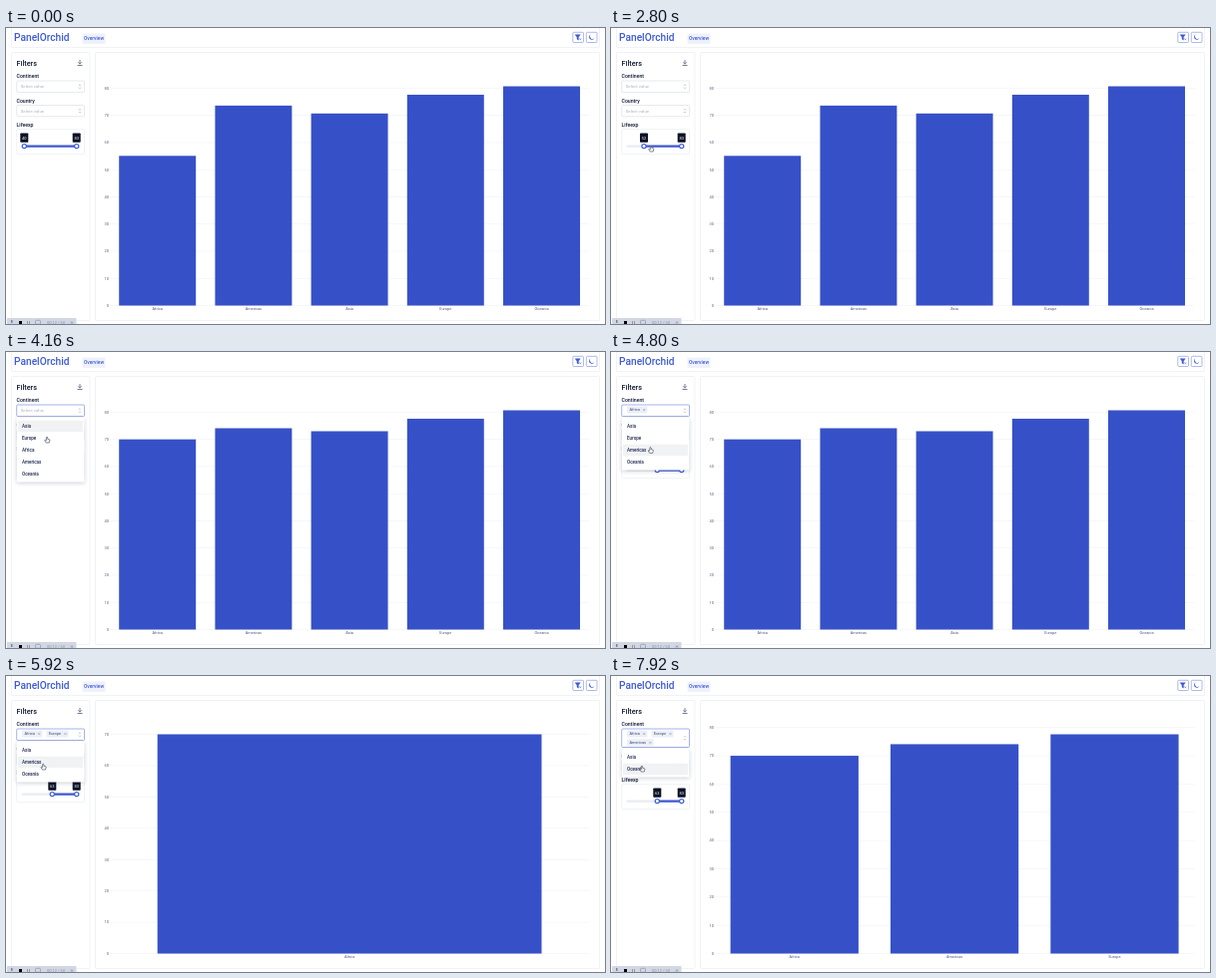
An HTML page with a canvas that plays this animation: 600 px wide and 297 px high, repeating every 8 s.

```html
<!DOCTYPE html>
<html lang="en">
<head>
<meta charset="utf-8">
<title>Dashboard filters</title>
<style>
  html, body { margin: 0; height: 100%; overflow: hidden; background: #fff; }
  canvas { display: block; width: 100vw; height: 100vh; }
</style>
</head>
<body>
<canvas></canvas>
<script>
const WIDTH = 600, HEIGHT = 297, LOOP = 8000;
const BLUE = '#3f5bd5', BAR = '#3650c8', NAVY = '#111936', LINE = '#e9eef3', MUTED = '#a9b0bd';
const canvas = document.querySelector('canvas');
const ctx = canvas.getContext('2d');

const CONTINENTS = ['Asia', 'Europe', 'Africa', 'Americas', 'Oceania'];
const ALL_LIVES = { Africa: 55.1, Americas: 73.6, Asia: 70.7, Europe: 77.6, Oceania: 80.7 };
const LONG_LIVES = { Africa: 70, Americas: 74.1, Asia: 73, Europe: 77.6, Oceania: 80.7 };

const FILTER_TIME = 3360, MENU_TIME = 3850;
const PICKS = [
  { name: 'Africa', at: 4600, charted: 4900 },
  { name: 'Europe', at: 5850, charted: 6200 },
  { name: 'Americas', at: 7350, charted: 7680 },
];

// Each key is [time, ...values].
const CURSOR = [
  [500, 330, 300], [1200, 83, 50], [1350, 83, 50], [1900, 18, 119], [2150, 18, 119],
  [2800, 40, 118], [3000, 46, 118], [3250, 46, 118], [3650, 42, 59], [3850, 42, 59],
  [4160, 41, 85], [4450, 40, 98], [4650, 40, 98], [5100, 38, 88], [6300, 37, 88],
  [7040, 31, 90], [7920, 31, 90],
];
const HANDLE = [[2150, 18.3], [2800, 33], [3050, 46.3]];

function sample(keys, time) {
  if (time <= keys[0][0]) return keys[0].slice(1);
  const next = keys.findIndex(key => key[0] > time);
  if (next < 0) return keys.at(-1).slice(1);
  const from = keys[next - 1], to = keys[next];
  const u = (time - from[0]) / (to[0] - from[0]);
  const eased = u * u * (3 - 2 * u);
  return from.slice(1).map((value, i) => value + (to[i + 1] - value) * eased);
}

function text(string, x, y, size, color = NAVY, weight = 400, align = 'left') {
  ctx.font = `${weight} ${size}px Roboto, sans-serif`;
  ctx.fillStyle = color;
  ctx.textAlign = align;
  ctx.fillText(string, x, y);
}

function box(x, y, w, h, fill, stroke, radius = 1) {
  ctx.beginPath();
  ctx.roundRect(x, y, w, h, radius);
  paint(fill, stroke);
}

function paint(fill, stroke, width = 0.7) {
  if (fill) { ctx.fillStyle = fill; ctx.fill(); }
  if (stroke) { ctx.strokeStyle = stroke; ctx.lineWidth = width; ctx.stroke(); }
}

function shape(path, x, y, fill, stroke, width) {
  ctx.save();
  ctx.translate(x, y);
  const outline = new Path2D(path);
  if (fill) { ctx.fillStyle = fill; ctx.fill(outline); }
  if (stroke) { ctx.strokeStyle = stroke; ctx.lineWidth = width; ctx.stroke(outline); }
  ctx.restore();
}

function circle(x, y, r, fill, stroke, width) {
  ctx.beginPath();
  ctx.arc(x, y, r, 0, Math.PI * 2);
  paint(fill, stroke, width);
}

function drawHeader() {
  box(5.5, -3, 589, 22.5, '#fff', LINE);
  text('PanelOrchid', 8, 13.2, 10.2, BLUE, 500);
  box(76.5, 5.5, 23, 10.5, '#eef1fc');
  text('Overview', 88, 12.3, 4.9, BLUE, 500, 'center');
  box(567.8, 4.3, 10.7, 10.2, '#fff', '#8c9de4');
  box(581.3, 4.3, 10.7, 10.2, '#fff', '#8c9de4');
  shape('M-3 -2.5H2L.2 0V2.8L-1.2 2V0ZM1.2 1.2L3 3M3 1.2L1.2 3', 573.2, 9.2, BLUE, BLUE, 0.5);
  shape('M-1.2 -2.7A2.8 2.8 0 1 0 2.7 1A2.7 2.7 0 0 1 -1.2 -2.7Z', 586.6, 9.3, BLUE);
}

function drawChart(lives, names) {
  const left = 103.6, width = 481, base = 278.5;
  const unit = 220 / Math.max(...names.map(name => lives[name]));
  const slot = width / names.length;
  box(89.5, 24.5, 505, 269, '#fff', LINE);
  for (let value = 0; value <= 80 && base - value * unit > 46; value += 10) {
    const y = base - value * unit;
    ctx.fillStyle = '#eff2f6';
    ctx.fillRect(left, y - 0.3, width, 0.6);
    text(value, 103, y + 1.4, 4, '#5a678c', 400, 'right');
  }
  names.forEach((name, i) => {
    const height = lives[name] * unit;
    ctx.fillStyle = BAR;
    ctx.fillRect(left + slot * (i + 0.1), base - height, slot * 0.8, height);
    text(name, left + slot * (i + 0.5), 283.2, 3.9, '#48557d', 400, 'center');
  });
}

function drawSelect(y, height, focused) {
  box(10.7, y, 67.8, height, '#fff', focused ? '#7f92e2' : '#dce0e6');
  const middle = y + height / 2;
  shape('M-1.2 -.8L0 -2L1.2 -.8M-1.2 .8L0 2L1.2 .8', 74, middle, null, '#8d95a5', 0.5);
}

function drawChips(names) {
  let x = 16, y = 54.5;
  for (const name of names) {
    ctx.font = '400 3.95px Roboto, sans-serif';
    const labelWidth = ctx.measureText(name).width;
    if (x + labelWidth + 10 > 72) { x = 16; y += 8.7; }
    box(x, y, labelWidth + 10, 7, '#eceff6');
    text(name, x + 2.5, y + 4.9, 3.95, '#3b4671');
    shape('M-1 -1L1 1M1 -1L-1 1', x + labelWidth + 6.8, y + 3.6, null, '#7e88a3', 0.5);
    x += labelWidth + 14;
  }
}

function drawSlider(y, low) {
  const high = 70.7;
  box(10.7, y - 17, 67.8, 25, '#fff', LINE);
  box(15.5, y - 1.2, 58.5, 2.4, '#e9ecef', null, 1.2);
  box(low, y - 1.2, high - low, 2.4, BLUE, null, 1.2);
  for (const x of [low, high]) {
    const value = Math.round(40 + 43 * (x - 18.3) / (high - 18.3));
    box(x - 4, y - 13.2, 8, 9.4, '#0d1226', null, 0.8);
    text(value, x, y - 7.1, 4, '#fff', 400, 'center');
    circle(x, y, 2.1, '#fff', BLUE, 1.2);
  }
}

function drawMenu(top, names, hovered) {
  ctx.save();
  ctx.shadowColor = 'rgba(20, 30, 60, .22)';
  ctx.shadowBlur = 4 * canvas.width / WIDTH;
  ctx.shadowOffsetY = canvas.width / WIDTH;
  box(10.7, top, 67.8, names.length * 12 + 4.5, '#fff');
  ctx.restore();
  names.forEach((name, i) => {
    const y = top + 2.7 + i * 12;
    if (i === hovered) box(12, y, 65, 11.6, '#f0f2f4');
    text(name, 16, y + 7.4, 4.6, '#1c2750', 500);
  });
}

function drawSidebar(time, picked) {
  const shift = picked.length > 2 ? 7 : 0;
  const open = time >= MENU_TIME;
  box(5.5, 24.5, 78.5, 269, '#fff', LINE);
  text('Filters', 10.5, 37.6, 7.3, NAVY, 500);
  shape('M0 -3V1M-1.8 -.7L0 1.2L1.8 -.7M-2.5 2.5H2.5', 74, 35, null, '#66718f', 0.9);

  text('Continent', 10.5, 50.3, 5.2, NAVY, 500);
  drawSelect(53, 11.5 + shift, open);
  if (picked.length) drawChips(picked);
  else text('Select value', 14.7, 60.2, 4.4, MUTED);

  text('Country', 10.5, 75 + shift, 5.2, NAVY, 500);
  drawSelect(77.5 + shift, 11.3, false);
  text('Select value', 14.7, 84.7 + shift, 4.4, MUTED);

  text('Lifeexp', 10.5, 99.3 + shift, 5.2, NAVY, 500);
  drawSlider(118.6 + shift, sample(HANDLE, time)[0]);

  if (open) {
    const top = 66 + shift;
    const pointerY = sample(CURSOR, time - 160)[1];
    const hovered = Math.max(0, Math.floor((pointerY - top - 2.5) / 12));
    drawMenu(top, CONTINENTS.filter(name => !picked.includes(name)), hovered);
  }
}

function drawRecorder() {
  ctx.fillStyle = '#d3d7e3';
  ctx.fillRect(1, 291, 69.5, 6);
  ctx.fillStyle = '#7b8296';
  ctx.fillRect(5, 293, 1.5, 3);
  ctx.fillStyle = '#000';
  ctx.fillRect(13, 294, 3, 3);
  ctx.fillStyle = '#9299ad';
  ctx.fillRect(21, 294, 1, 3);
  ctx.fillRect(23, 294, 1, 3);
  box(29.5, 293.3, 5, 4, null, '#8b93a8');
  text('00:12 / 60', 41, 297, 4, '#8c94a9');
  shape('M-1 -1L1 1M1 -1L-1 1', 66, 295.6, null, '#687087', 0.6);
}

function drawCursor(time) {
  if (time < CURSOR[0][0]) return;
  const [x, y] = sample(CURSOR, time);
  if (time < 1850) {
    shape('M0 0V4.8L1.2 3.8L2 5.4L2.8 5L2 3.5H3.4Z', x, y, '#111', '#fff', 0.4);
  } else {
    shape('M-.6 .5Q0 -.5 .6 .5V2.2L2.6 2.8Q3 3 2.8 4L2.2 6H-.8L-2.3 3.6Q-2 2.8 -.6 3.8Z',
      x, y, '#fff', '#30364a', 0.6);
  }
}

function draw(now) {
  const time = now % LOOP;
  const ratio = devicePixelRatio || 1;
  const w = Math.round(innerWidth * ratio), h = Math.round(innerHeight * ratio);
  if (canvas.width !== w || canvas.height !== h) { canvas.width = w; canvas.height = h; }
  ctx.setTransform(w / WIDTH, 0, 0, h / HEIGHT, 0, 0);
  ctx.fillStyle = '#fff';
  ctx.fillRect(0, 0, WIDTH, HEIGHT);

  const lives = time < FILTER_TIME ? ALL_LIVES : LONG_LIVES;
  const picked = PICKS.filter(pick => time >= pick.at).map(pick => pick.name);
  const charted = PICKS.filter(pick => time >= pick.charted).map(pick => pick.name).sort();
  drawHeader();
  drawChart(lives, charted.length ? charted : Object.keys(lives));
  drawSidebar(time, picked);
  drawRecorder();
  drawCursor(time);
  requestAnimationFrame(draw);
}

const start = performance.now();
(function begin() {
  draw(0);
})();
function draw0() {}
</script>
</body>
</html>
```
